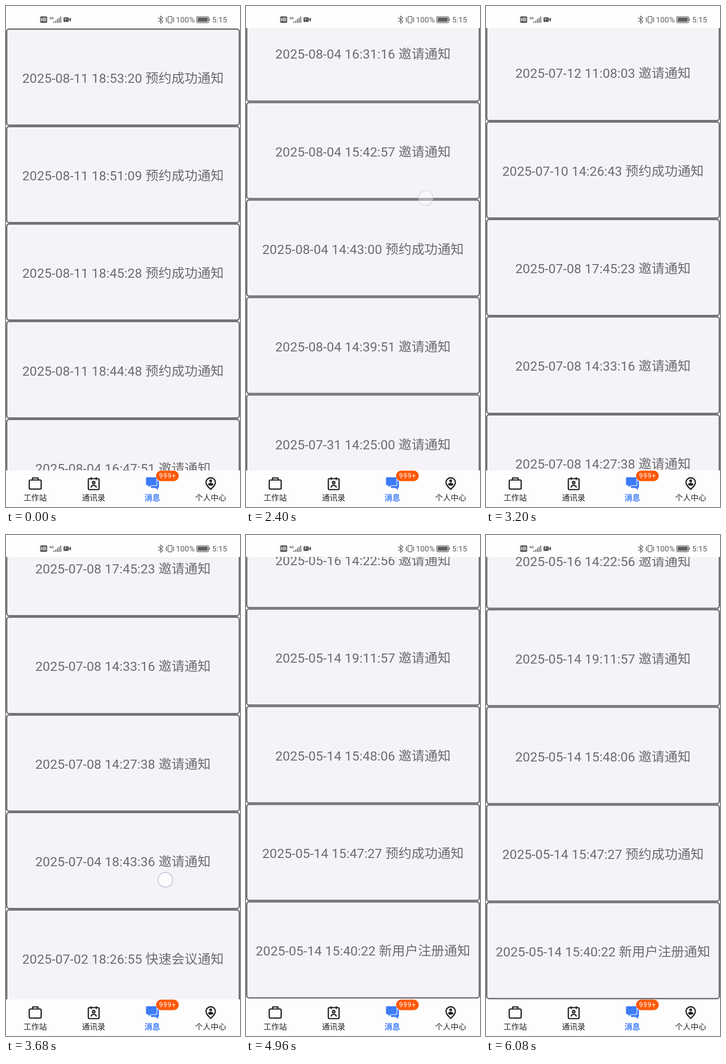
Write an HTML page that moves like this. It is 511 by 1095 pixels and loops after 6400 ms.

```html
<!DOCTYPE html>
<html lang="zh-CN">
<head>
<meta charset="utf-8">
<title>消息</title>
<style>
  html, body { margin: 0; width: 100%; height: 100%; overflow: hidden; background: #fefefe; }
  body { position: relative; font-family: Roboto, "Noto Sans CJK SC", "Noto Sans CJK", sans-serif; }
  #view { position: absolute; top: 48px; left: 0; width: 511px; height: 967px; overflow: hidden; }
  #list { padding-top: .5px; }
  .card {
    box-sizing: border-box; width: 511px; height: 213.3px;
    display: flex; align-items: center; justify-content: center;
    border: 3px solid #737176; border-radius: 7px; background: #f5f3f7;
    color: #6e6c70; font-size: 28.4px; letter-spacing: .1px; white-space: nowrap;
  }
  #chrome { position: absolute; top: 0; left: 0; }
  #finger {
    position: absolute; left: -17px; top: -17px; width: 34px; height: 34px; box-sizing: border-box;
    border: 2px solid #c6c8da; border-radius: 50%; background: rgba(255, 255, 255, .75);
  }
  .line { fill: none; stroke: #222; stroke-width: 2.7; stroke-linejoin: round; stroke-linecap: round; }
  .thin { fill: none; stroke: #606060; stroke-width: 1.4; }
  .tab { font-size: 17px; font-weight: 500; fill: #222; text-anchor: middle; }
  .tab .active { font-weight: 700; fill: #3d7bf8; }
</style>
</head>
<body>
<div id="view"><div id="list"></div></div>

<svg id="chrome" width="511" height="1095" viewBox="0 0 511 1095">
  <!-- status bar -->
  <g fill="#606060">
    <rect x="74.500" y="22.500" width="15.500" height="14.500" rx="2.500"/>
    <text x="82.200" y="33" font-size="9" font-weight="700" fill="#fff" text-anchor="middle">HD</text>
    <text x="94.500" y="28.500" font-size="8" font-weight="700">4G</text>
    <path d="M103.500 34h2v3h-2zM107.300 32h2v5h-2zM111 29h2v8h-2zM114.800 26h2v11h-2zM118.500 23h2v14h-2z"/>
    <rect x="125.500" y="24.500" width="11.500" height="10.500" rx="2"/>
    <path d="M137 29l5-3.500v8.500l-5-3.500z"/>
    <circle cx="130" cy="28.500" r="1.200" fill="#fff"/>
    <path class="thin" d="M332.500 25l10 9-5 4v-16l5 4-10 9"/>
    <rect class="thin" x="353.800" y="22.800" width="8.600" height="14" rx="1.200"/>
    <path class="thin" d="M351 25l-1.500 2 1.500 2-1.500 2 1.500 2-1.500 2M365.200 25l1.500 2-1.500 2 1.500 2-1.500 2 1.500 2"/>
    <text x="371" y="36" font-size="17">100%</text>
    <rect class="thin" x="416.600" y="23.100" width="25.600" height="13.400" rx="2"/>
    <rect x="418.500" y="25" width="21.800" height="9.600" rx=".8"/>
    <rect x="443.400" y="27" width="1.800" height="5.600" rx=".8"/>
    <text x="450" y="36" font-size="17">5:15</text>
  </g>

  <!-- tab bar -->
  <rect y="1015" width="511" height="80" fill="#fdfdfe"/>
  <rect class="line" x="50.800" y="1036" width="26" height="19.800" rx="2.500"/>
  <path class="line" d="M58 1035.500v-4h12v4"/>
  <rect class="line" x="179.800" y="1033" width="23.500" height="24" rx="2.500"/>
  <path class="line" d="M186 1031v4M197.200 1031v4M186 1051.500c1-5 10-5 11 0"/>
  <circle class="line" cx="191.500" cy="1041.700" r="2.600"/>
  <path fill="#3d7bf8" d="M316 1037h15.500q2.500 0 2.500 2.500v11q0 2.500-2 2.500v5l-5-4.500h-8q-3 0-3-3z"/>
  <path fill="#3d7bf8" stroke="#fdfdfe" stroke-width="1.300" d="M308 1029.300h18.500q3 0 3 3v13q0 3-3 3h-10l-6 5v-5h-2.500q-3 0-3-3v-13q0-3 3-3z"/>
  <path class="line" d="M447 1056.500c-6-6-10.200-10-10.200-15.200a10.200 10.200 0 0 1 20.400 0c0 5.200-4.200 9.200-10.200 15.200z"/>
  <g fill="#222">
    <circle cx="447" cy="1037.800" r="3.100"/>
    <path d="M440.800 1046c1-5.500 11.400-5.500 12.400 0-3 3.400-9.400 3.400-12.400 0z"/>
  </g>
  <g class="tab">
    <text x="63.700" y="1081">工作站</text>
    <text x="191.300" y="1081">通讯录</text>
    <text class="active" x="319.500" y="1081">消息</text>
    <text x="447" y="1081">个人中心</text>
  </g>
  <rect x="327.700" y="1015.600" width="49.600" height="22.800" rx="11.400" fill="#ff5a08"/>
  <text x="353" y="1032" font-size="14.200" letter-spacing="1.200" fill="#fff" text-anchor="middle">999+</text>
</svg>
<div id="finger"></div>

<script>
const LOOP = 6400, STEP = 160, FIRST = 1120, LAST = 6080, PITCH = 213.3;
const kinds = { a: '邀请', b: '预约成功', c: '快速会议', d: '新用户注册' };

// Known rows by starting index; the gaps are filled with evenly spaced dates.
const runs = {
  0: ['08-11 18:53:20 b', '08-11 18:51:09 b', '08-11 18:45:28 b', '08-11 18:44:48 b', '08-04 16:47:51 a'],
  6: ['08-04 16:31:16 a', '08-04 15:42:57 a', '08-04 14:43:00 b', '08-04 14:39:51 a', '07-31 14:25:00 a'],
  14: ['07-24 15:50:05 a', '07-23 09:09:26 b', '07-22 11:23:26 a', '07-21 18:35:15 b', '07-21 18:34:44 b'],
  25: ['07-08 17:45:23 a', '07-08 14:33:16 a', '07-08 14:27:38 a', '07-04 18:43:36 a', '07-02 18:26:55 c'],
  35: ['05-16 14:30:03 a', '05-16 14:27:51 a', '05-16 14:25:24 a', '05-16 14:22:56 a',
       '05-14 19:11:57 a', '05-14 15:48:06 a', '05-14 15:47:27 b', '05-14 15:40:22 d']
};

const rows = [];
for (const start in runs) {
  runs[start].forEach((text, i) => {
    const [day, time, kind] = text.split(' ');
    rows[+start + i] = { at: Date.parse(`2025-${day}T${time}Z`), kind };
  });
}
for (let i = 0; i < rows.length; i++) {
  if (rows[i]) continue;
  let next = i;
  while (!rows[next]) next++;
  const prev = rows[i - 1].at;
  rows[i] = { at: prev + (rows[next].at - prev) / (next - i + 1), kind: i % 3 ? 'a' : 'b' };
}

function label({ at, kind }) {
  const date = new Date(at), hour = date.getUTCHours();
  if (hour < 9 || hour > 19) date.setUTCHours(9 + hour % 10);
  return `${date.toISOString().slice(0, 19).replace('T', ' ')} ${kinds[kind]}通知`;
}

const list = document.getElementById('list');
const finger = document.getElementById('finger');
for (const row of rows) {
  const card = document.createElement('div');
  card.className = 'card';
  card.textContent = label(row);
  list.append(card);
}

const drag = p => p;
const fling = p => 1 - (1 - p) ** 3;
const END = 39 * PITCH - 113.5;

// [time, scroll, easing towards this key]
const scrollKeys = [
  [FIRST, 0], [1440, 320, drag], [2240, 991, fling],
  [2400, 6 * PITCH + 52.6, drag], [2720, 2524, fling],
  [2880, 15 * PITCH - 98.5, drag], [3680, 26 * PITCH - 129.7, fling],
  [3840, 5921, drag], [4320, 36 * PITCH - 167.5, fling],
  [4480, 8051, drag], [4640, END + 40, drag], [5120, END, fling],
  [5280, END, drag], [5440, END + 40, drag], [LAST, END, fling]
];

// [start, end, x0, y0, x1, y1, final opacity]
const swipes = [
  [1120, 1440, 345, 790, 400, 470, 1],
  [2240, 2400, 350, 760, 392.5, 419.5, .5],
  [2720, 2880, 350, 760, 453, 183.5, 1],
  [3680, 3840, 348, 753.5, 430, 250, 1],
  [4320, 4480, 344.5, 807, 420, 270, 1],
  [5280, 5440, 345, 780, 390, 520, 1]
];

const mix = (a, b, p) => a + (b - a) * p;

function scrollAt(t) {
  const i = scrollKeys.findIndex(key => key[0] >= t);
  if (i <= 0) return 0;
  const [t0, s0] = scrollKeys[i - 1], [t1, s1, ease] = scrollKeys[i];
  return mix(s0, s1, ease((t - t0) / (t1 - t0)));
}

function draw(now) {
  const time = now % LOOP;
  const t = time < FIRST ? 0 : Math.min(LAST, Math.floor(time / STEP) * STEP);
  list.style.transform = `translateY(${-scrollAt(t)}px)`;

  const swipe = swipes.find(([from, to]) => t >= from && t <= to);
  finger.style.opacity = 0;
  if (swipe) {
    const [from, to, x0, y0, x1, y1, fade] = swipe;
    const p = (t - from) / (to - from);
    finger.style.transform = `translate(${mix(x0, x1, p)}px, ${mix(y0, y1, p)}px)`;
    finger.style.opacity = mix(1, fade, p);
  }
}

const begin = performance.now();
function frame() {
  draw(performance.now() - begin);
  requestAnimationFrame(frame);
}
frame();
</script>
</body>
</html>
```
